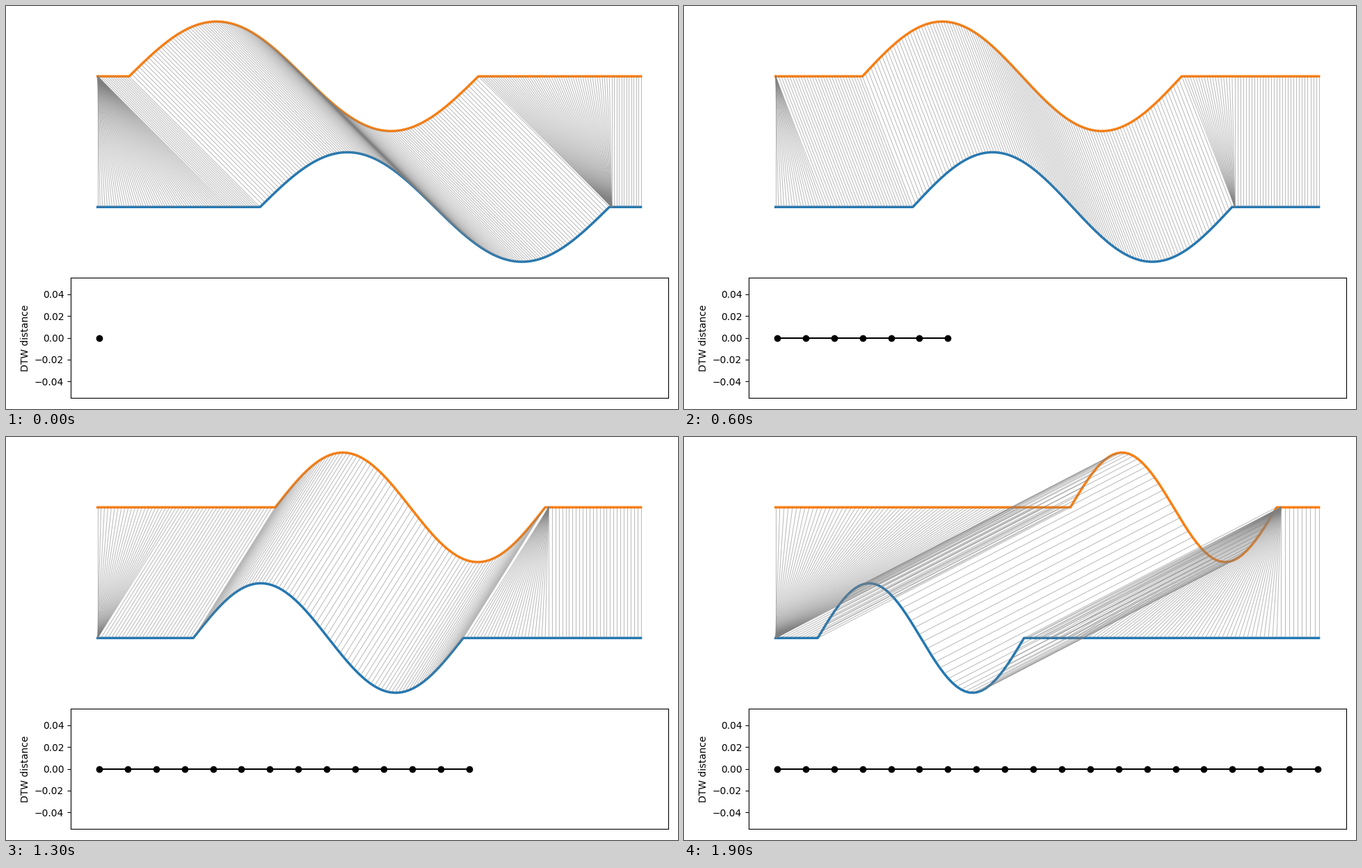
A matplotlib script for the animation above (2000 ms loop, 966 px wide and 580 px high).

```python
import numpy as np
import matplotlib.pyplot as plt
from matplotlib.animation import FuncAnimation
from matplotlib.collections import LineCollection

W, H, DPI = 966, 580, 100
FRAMES = 20
X0, X1 = 131.7, 912.6          # horizontal extent of both series
TOP, BOTTOM, AMP = 101.2, 289.3, 78.8


def series(lead, wave, trail):
    """Flat start, one sine period, flat end."""
    return np.concatenate([np.zeros(lead),
                           np.sin(np.linspace(0, 2 * np.pi, wave)),
                           np.zeros(trail)])


def warp(lead, wave, trail):
    """Zero-cost alignment of the series with its mirrored padding."""
    n = lead + wave + trail
    shift = abs(lead - trail)
    zero = max(lead, trail) + wave     # first flat sample after the wave
    long = np.concatenate([np.arange(zero), np.full(shift, zero),
                           np.arange(zero, n)])
    short = np.concatenate([np.zeros(shift, int), np.arange(n)])
    return (long, short) if lead >= trail else (short, long)


fig = plt.figure(figsize=(W / DPI, H / DPI), dpi=DPI, facecolor="white")

stage = fig.add_axes([0, 0, 1, 1])
stage.set_xlim(0, W)
stage.set_ylim(H, 0)
stage.axis("off")
blue, = stage.plot([], [], color="C0", lw=2.5)
orange, = stage.plot([], [], color="C1", lw=2.5)
links = LineCollection([], colors="grey", alpha=0.5, linewidths=0.8,
                       capstyle="projecting", zorder=3)
stage.add_collection(links)

chart = fig.add_axes([93 / W, 1 - 564 / H, 859 / W, 173 / H])
chart.set_xlim(-1, FRAMES)
chart.set_ylim(-0.055, 0.055)
chart.set_xticks([])
chart.set_yticks(np.arange(-2, 3) * 0.02)
chart.set_ylabel("DTW distance")
track, = chart.plot([], [], "ko-")


def draw(f):
    lead, wave = 67 - 3 * f, 145 - 5 * f
    trail = 80 - lead
    x = np.linspace(X0, X1, lead + wave + trail)
    low = BOTTOM - AMP * series(lead, wave, trail)
    high = TOP - AMP * series(trail, wave, lead)
    blue.set_data(x, low)
    orange.set_data(x, high)
    i, j = warp(lead, wave, trail)
    ends = [np.column_stack([x[i], low[i]]), np.column_stack([x[j], high[j]])]
    links.set_segments(np.stack(ends, axis=1))
    track.set_data(np.arange(f + 1), np.zeros(f + 1))
    return blue, orange, links, track


anim = FuncAnimation(fig, draw, frames=FRAMES, interval=100,
                     init_func=lambda: draw(0), repeat=True, repeat_delay=0)
plt.show()
```
